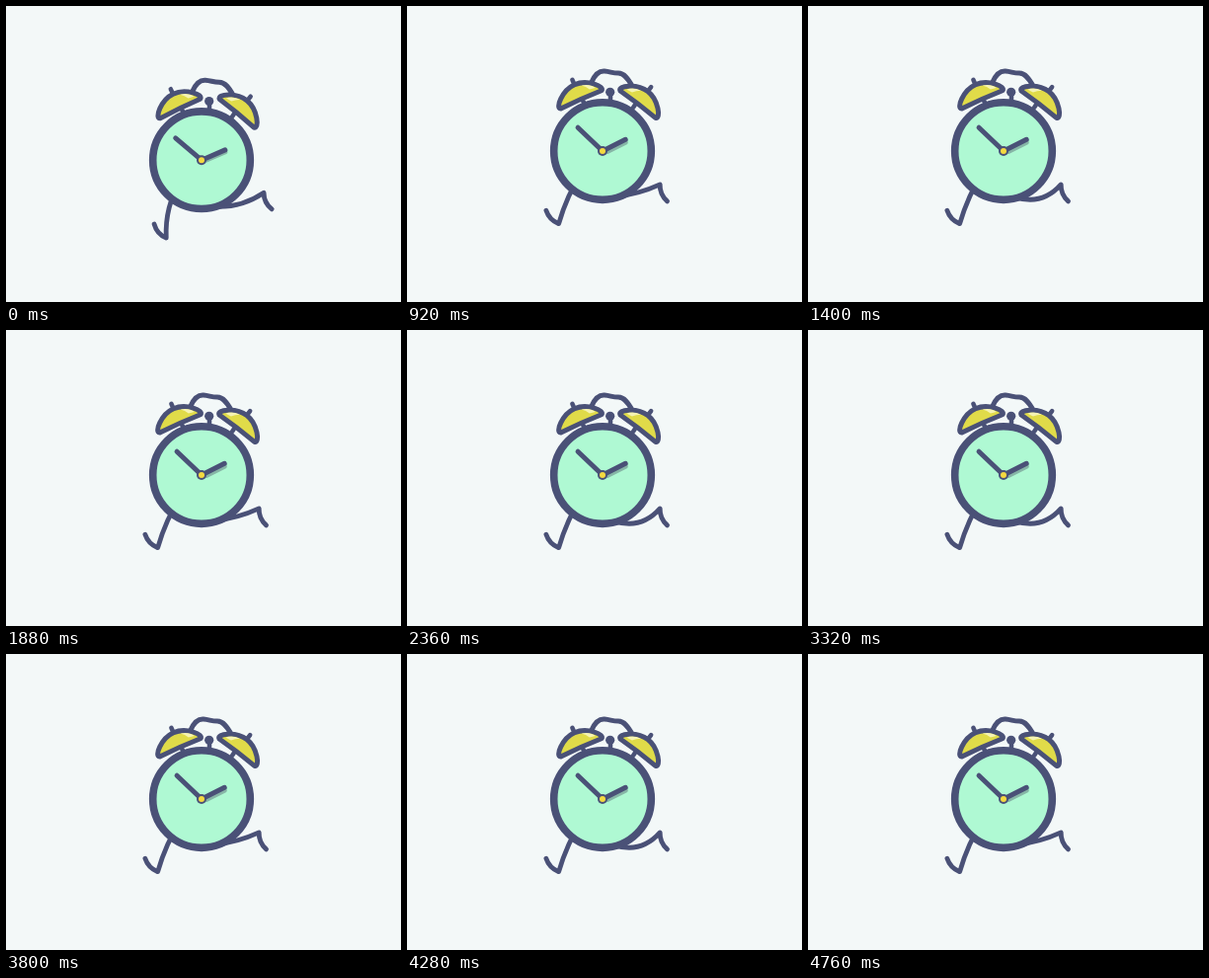
Animation of 400x300 px, one loop 4.8 s. Source, as an HTML page:

```html
<!DOCTYPE html>
<html lang="en">
<head>
<meta charset="utf-8">
<title>Running alarm clock</title>
<style>
  html, body { margin: 0; width: 100%; height: 100%; overflow: hidden; background: #f3f8f8; }
  svg { display: block; width: 400px; height: 300px; }
  .line { fill: none; stroke: #4a5177; stroke-linecap: round; stroke-linejoin: round; }
</style>
</head>
<body>
<svg viewBox="0 0 400 300">
  <defs>
    <g id="bell">
      <path class="line" stroke-width="4.5" d="M0-14V-20"/>
      <path class="line" style="fill:#e0db49" stroke-width="5"
        d="M-22.5 2C-28 0-14-14.500 0-14.500S28 0 22.500 2Q0 1-22.500 2Z"/>
      <path d="M6-11Q15-9 18-3L12-4Q10-8 6-11Z" fill="#f6f4b4"/>
    </g>
  </defs>
  <g class="line" stroke-width="4.800"><path id="legA"/><path id="legB"/></g>
  <g id="body">
    <path id="handle" class="line" stroke-width="5"
      d="M187-70C190-77 194-81.500 200-81S208-79 214-79S224-73 228-66"/>
    <path class="line" stroke-width="4.500" d="M177-53l4 7M233-50l-4 6M206-59V-50"/>
    <circle cx="205.700" cy="-59.700" r="4.600" fill="#4a5177"/>
    <circle class="line" style="fill:#aff9d3" cx="198" r="49.300" stroke-width="7.600"/>
    <use id="bellL" href="#bell"/>
    <use id="bellR" href="#bell"/>
    <path id="shadow" class="line" style="stroke:#86b5a6" stroke-width="4" d="M4 0H25"/>
    <path id="minute" class="line" stroke-width="5" d="M0 0H-34.500"/>
    <path id="hour" class="line" stroke-width="5" d="M0 0H26"/>
    <circle cx="198" r="5" fill="#4a5177"/>
    <circle cx="198" r="3" fill="#f5d940"/>
  </g>
</svg>
<script>
const STRIDE = 960, GROUND = 235, FOOT = 18.5;
const { sin, cos, min, hypot, PI } = Math;
const $ = id => document.getElementById(id);
const place = (id, transform) => $(id).setAttribute('transform', transform);

// Quadratic segment from a to b, bowed sideways by `bend`
function bowTo(a, b, bend) {
  const dx = b.x - a.x, dy = b.y - a.y, k = bend / hypot(dx, dy);
  return `Q${(a.x + b.x) / 2 - dy * k} ${(a.y + b.y) / 2 + dx * k} ${b.x} ${b.y}`;
}

// Phase 0 is the landing in front, half a turn later the leg trails behind.
function drawLeg(id, phase, cy, slack) {
  const c = cos(phase), s = sin(phase), c2 = cos(2 * phase), s2 = sin(2 * phase);
  const hip = { x: 193.5 - 16.5 * c, y: cy + 33.5 - 13.5 * c };
  const ankle = {
    x: 206 - 49.5 * c + 13.3 * s + 5.5 * c2 + 12 * s2,
    y: min(GROUND, cy + 64 + 23 * c + 9.5 * s - 8 * c2 + 6.7 * s2)
  };
  const tilt = (146.5 + 82.5 * c) * PI / 180;
  const toe = { x: ankle.x + FOOT * cos(tilt), y: ankle.y + FOOT * sin(tilt) };
  const knee = 9 + 10 * s2 + slack * (1 - c);
  $(id).setAttribute('d',
    `M${hip.x} ${hip.y}` + bowTo(hip, ankle, knee) + bowTo(ankle, toe, -4.5 * c));
}

function draw(time) {
  const phase = 2 * PI * time / STRIDE;
  const bounce = sin(2 * phase + 0.618);
  const cy = 145 + 19 * bounce;
  const hour = 7 * bounce - 27.5;
  place('body', `translate(0 ${cy})`);
  place('handle', `translate(${4 * bounce - 0.4} 0)`);
  place('bellL', `translate(175.500 -54) rotate(${-23.5 - 4 * bounce})`);
  place('bellR', `translate(235 -49) rotate(${37 + 4 * bounce}) scale(-1 1)`);
  place('minute', `translate(198 0) rotate(${44.5 - 7 * bounce})`);
  place('hour', `translate(198 0) rotate(${hour})`);
  place('shadow', `translate(199.500 ${2.8 - 1.5 * bounce}) rotate(${hour})`);
  drawLeg('legA', phase, cy, 6);
  drawLeg('legB', phase + PI, cy, 0);
}

const start = performance.now();
function tick() {
  draw((performance.now() - start) % 4800);
  requestAnimationFrame(tick);
}
tick();
</script>
</body>
</html>
```
